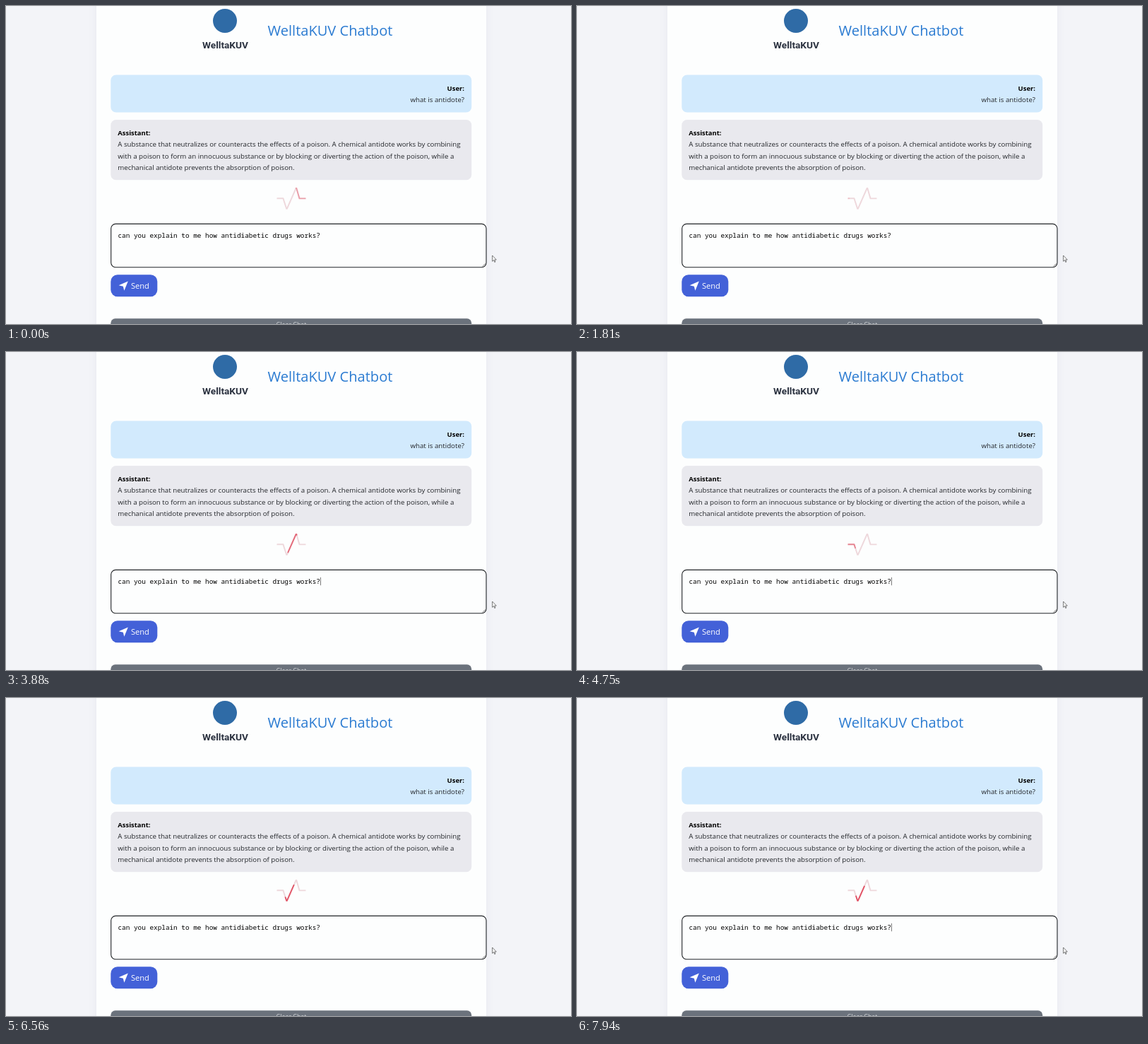
Animation, 800 px wide and 450 px high, one loop 8000 ms. Source, as an HTML page:

```html
<!DOCTYPE html>
<html lang="en">
<head>
<meta charset="utf-8">
<title>Health chatbot</title>
<style>
  html, body { margin: 0; width: 100%; height: 100%; overflow: hidden; background: #f3f4f8; }
  svg { display: block; }
  text { font: 9.71px "Open Sans", "Noto Sans", sans-serif; fill: #24272b; }
  .end { text-anchor: end; }
  .mid { text-anchor: middle; }
  .role { font-size: 9.45px; font-weight: 700; fill: #000; }
  .title { font-size: 20.1px; fill: #2b7bd1; }
  .brand { font: 700 13.7px Roboto, sans-serif; fill: #2b3240; }
  .input { font: 9.37px "Noto Sans Mono", monospace; fill: #000; }
  .send { font-size: 11.1px; fill: #fff; }
  .clear { font-size: 8.9px; fill: #d3d6d9; }
  .card { fill: #fdfefe; filter: drop-shadow(0 0 6px rgba(30, 40, 80, .06)); }
  .pulse { fill: none; stroke-width: 3; stroke-linecap: round; stroke-linejoin: round; }
  #beat { stroke: #e0354b; stroke-dasharray: 48 144; }
</style>
</head>
<body>
<svg width="800" height="450" viewBox="0 0 800 450">
  <rect class="card" x="128" y="-20" width="552" height="490"/>

  <circle cx="310" cy="21" r="17" fill="#2f6ba6"/>
  <text class="brand mid" x="310.5" y="60">WelltaKUV</text>
  <text class="title" x="370.5" y="42">WelltaKUV Chatbot</text>

  <rect x="148.3" y="97.5" width="510.9" height="53" rx="7.5" fill="#d2eafd"/>
  <text class="role end" x="649" y="119.6">User:</text>
  <text class="end" x="649" y="136">what is antidote?</text>

  <rect x="148.3" y="161" width="510.9" height="85.3" rx="7.5" fill="#e9e9ee"/>
  <text class="role" x="158.3" y="183">Assistant:</text>
  <text x="158.3" y="199.3">A substance that neutralizes or counteracts the effects of a poison. A chemical antidote works by combining</text>
  <text x="158.3" y="215.7">with a poison to form an innocuous substance or by blocking or diverting the action of the poison, while a</text>
  <text x="158.3" y="232.1">mechanical antidote prevents the absorption of poison.</text>

  <svg class="pulse" x="383.5" y="257" width="40.96" height="30.72" viewBox="0 0 64 48">
    <defs><polyline id="trace" points="0.157 23.954 14 23.954 21.843 48 43 0 50 24 64 24"/></defs>
    <use href="#trace" stroke="#eed8dc"/>
    <use id="beat" href="#trace"/>
  </svg>

  <rect x="148.7" y="308.4" width="531.3" height="61.3" rx="6.4" fill="#fdfefe" stroke="#222528" stroke-width="1.1"/>
  <path d="M674.5 368.5l4-4M677 368.5l1.7-1.7" stroke="#555" stroke-width=".7"/>
  <text class="input" x="158.5" y="327.8">can you explain to me how antidiabetic drugs works?</text>
  <rect id="caret" x="445.1" y="318.9" width=".7" height="11.3" fill="#444"/>

  <rect x="148.3" y="380.3" width="66" height="31" rx="9.6" fill="#4361d8"/>
  <path d="M172.8 389.6L159.6 395.2l6.2 1.6 1.6 5.9z" fill="#fff"/>
  <text class="send" x="177" y="400.4">Send</text>

  <rect x="148.3" y="442.3" width="510.9" height="26" rx="6.4" fill="#6b727c"/>
  <text class="clear mid" x="404" y="454.3">Clear Chat</text>

  <path d="M688.6 353v8.3l1.9-1.8 1.3 3 1.2-.5-1.3-2.9h2.6z" fill="#fff" stroke="#444" stroke-width=".7"/>
</svg>
<script>
  const LOOP = 8000;
  const BEAT = 1400, BEAT_START = 0.47, FADE_END = 0.725;
  const BLINK = 1060, BLINK_ON = 212;
  const beat = document.getElementById('beat');
  const caret = document.getElementById('caret');

  function draw() {
    const t = performance.now() % LOOP;

    const p = (t / BEAT + BEAT_START) % 1;
    beat.style.strokeDashoffset = 192 * (1 - p);
    beat.style.opacity = p < FADE_END ? 1 - p / FADE_END : (p - FADE_END) / (1 - FADE_END);

    const blink = (t - BLINK_ON + BLINK) % BLINK;
    caret.style.visibility = blink < BLINK / 2 ? 'visible' : 'hidden';

    requestAnimationFrame(draw);
  }
  draw();
</script>
</body>
</html>
```
